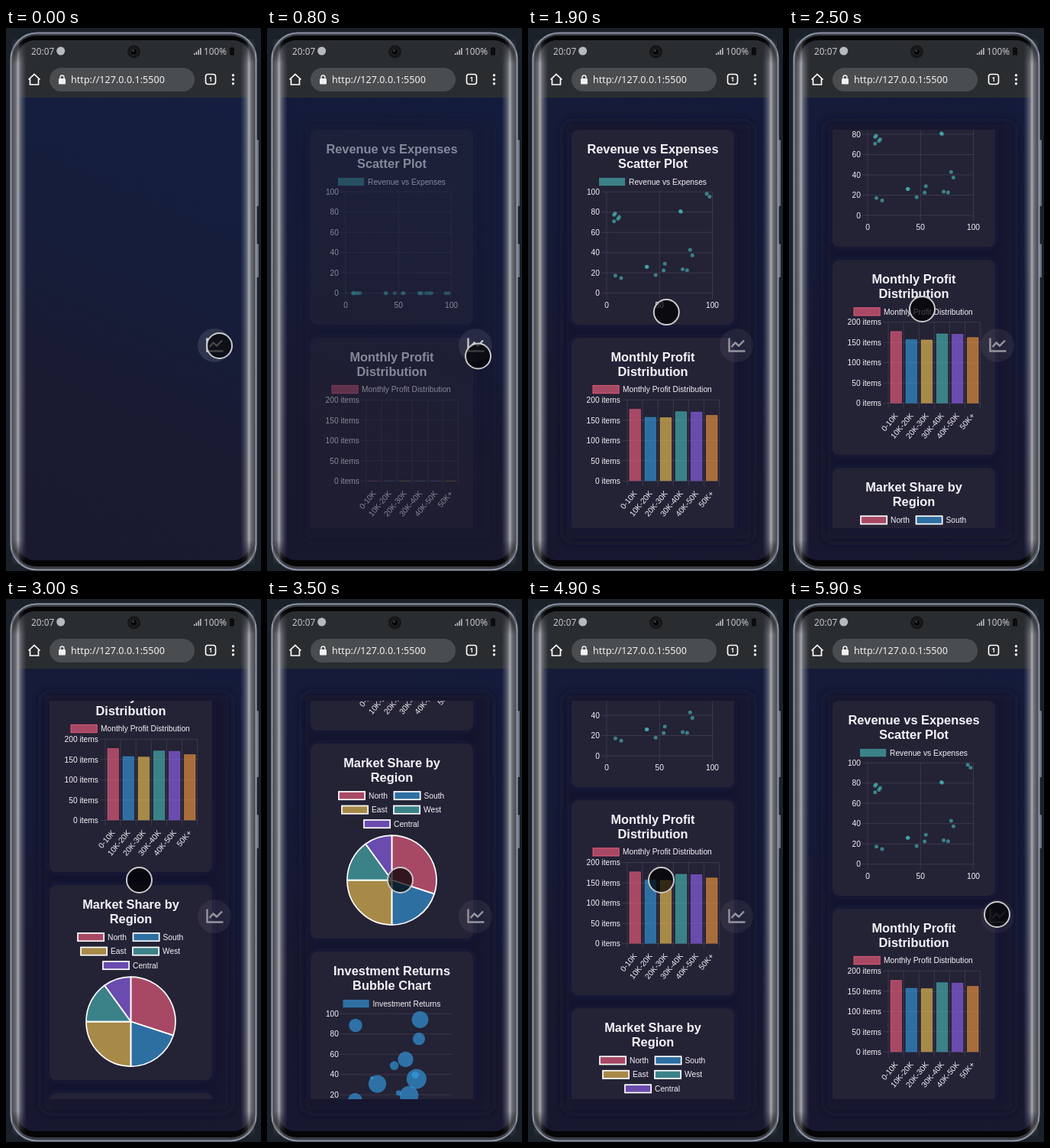
Recreate the animation shown at these times as an HTML page. Size 334x710 px, loop 6 s.

```html
<!DOCTYPE html>
<html lang="en">
<head>
<meta charset="utf-8">
<title>Dashboard on a phone</title>
<style>
html, body { margin: 0; width: 100%; height: 100%; overflow: hidden; background: #1a2128; }
svg { display: block; width: 100vw; height: 100vh; }
.ui { font-family: "Noto Sans", "Open Sans", sans-serif; }
.chart { font: 10.26px "Liberation Sans", Arial, sans-serif; fill: #f4f4f8; }
.title { font-size: 16.4px; font-weight: bold; text-anchor: middle; }
.grid { stroke: #fff; stroke-opacity: .11; stroke-width: .9; fill: none; }
</style>
</head>
<body>
<svg viewBox="0 0 334 710" preserveAspectRatio="none">
  <defs>
    <linearGradient id="page" x1=".6" y1="0" x2=".4" y2="1">
      <stop offset="0" stop-color="#141f41"/><stop offset=".45" stop-color="#161d3a"/>
      <stop offset=".75" stop-color="#1a1a30"/><stop offset="1" stop-color="#19192f"/>
    </linearGradient>
    <linearGradient id="glare">
      <stop offset="0" stop-color="#4a4b50"/><stop offset=".25" stop-color="#6c6d73"/>
      <stop offset=".42" stop-color="#a9aab0"/><stop offset=".55" stop-color="#8f919a" stop-opacity=".65"/>
      <stop offset="1" stop-color="#606880" stop-opacity="0"/>
    </linearGradient>
    <linearGradient id="fade" x1="0" x2="0" y1="0" y2="1">
      <stop offset="0" stop-color="#000"/><stop offset=".05" stop-color="#fff"/>
      <stop offset=".95" stop-color="#fff"/><stop offset="1" stop-color="#000"/>
    </linearGradient>
    <mask id="ends"><rect y="12" width="334" height="692" fill="url(#fade)"/></mask>
    <filter id="soft" x="-20%" y="-20%" width="140%" height="140%"><feGaussianBlur stdDeviation="6"/></filter>
    <clipPath id="screen"><rect x="15" y="16" width="305" height="680" rx="23"/></clipPath>
    <clipPath id="view"><rect x="40" y="133" width="248" height="521"/></clipPath>
  </defs>

  <rect width="334" height="710" fill="#1a2128"/>
  <rect x="327" y="146" width="4" height="87" rx="1.5" fill="#6a727f"/>
  <rect x="327" y="282" width="4" height="44" rx="1.5" fill="#6a727f"/>
  <rect x="6.5" y="6.5" width="321" height="702" rx="34" fill="#3a3c43" stroke="#8d95a8" stroke-width="2.2"/>
  <rect x="9" y="10" width="316" height="694" rx="31" fill="#050506"/>

  <g clip-path="url(#screen)">
    <rect x="15" y="16" width="305" height="680" fill="url(#page)"/>
    <g id="popup">
      <rect x="15" y="16" width="305" height="680" fill="#14152e" opacity=".35"/>
      <rect x="46" y="122" width="250" height="550" rx="10" fill="#18182d" filter="url(#soft)"/>
      <g clip-path="url(#view)"><g id="cards" class="chart"></g></g>
    </g>
    <rect x="15" y="16" width="305" height="75" fill="#2a2d30"/>
  </g>

  <g class="ui" fill="#f2f2f2">
    <g font-size="11.8" fill="#c4c6c8">
      <text x="33" y="35">20:07</text>
      <circle cx="71.7" cy="30" r="5.5" fill="#b7babc"/>
      <text x="259" y="35">100%</text>
      <path d="M246 35v-2h1.5v2zM248.7 35v-4h1.5v4zM251.4 35v-6.5h1.5v6.5zM254.1 35v-9h1.5v9z"/>
      <path d="M293 26h1.5v-1h3v1h1.5v9.5h-6z" fill="#0b0c0d"/>
    </g>
    <circle cx="167.5" cy="31" r="8.5" fill="#141618"/>
    <circle cx="167.5" cy="31" r="4.5" fill="#050608" stroke="#2d3033"/>
    <circle cx="166.5" cy="29.5" r="1.2" fill="#50565e"/>
    <path d="M29.5 67.5L37 60.5L44.5 67.5M31.5 66.5V74H42.5V66.5" fill="none" stroke="#fff" stroke-width="1.7"/>
    <rect x="57" y="52" width="190" height="31" rx="15.5" fill="#4a4d50"/>
    <rect x="69" y="66" width="9" height="7.5" rx="1.2"/>
    <path d="M71 66.5v-2a2.5 2.5 0 0 1 5 0v2" fill="none" stroke="#f2f2f2" stroke-width="1.4"/>
    <text x="85" y="72" font-size="12.6">http://127.0.0.1:5500</text>
    <rect x="261.5" y="60.5" width="13" height="13" rx="3" fill="none" stroke="#fff" stroke-width="1.6"/>
    <text x="268" y="70.3" font-size="8.5" font-weight="bold" text-anchor="middle">1</text>
    <path d="M297.5 61.7v11.1" stroke="#f2f2f2" stroke-width="3.4" stroke-linecap="round" stroke-dasharray="0 5.5"/>
  </g>

  <circle id="halo" cx="273" cy="415" r="22" fill="#fff"/>
  <path id="icon" d="M263.5 405.5V422.5H284.5M266.5 417L271.5 411.5L276 415.5L283 408.5" fill="none" stroke-width="2.4"/>

  <g mask="url(#ends)">
    <rect x="8" y="14" width="19" height="688" fill="url(#glare)"/>
    <rect x="8" y="14" width="19" height="688" fill="url(#glare)" transform="matrix(-1 0 0 1 334 0)"/>
  </g>

  <circle id="cursor" r="16.5" fill="#000" fill-opacity=".7" stroke="#c9c9cc" stroke-width="2"/>
</svg>
<script>
const NS = "http://www.w3.org/2000/svg";
const $ = id => document.getElementById(id);
const PITCH = 272, LOOP = 6000, STEP = 100, MAX_SCROLL = 550;
const LEFT = 103, TOP = 214, BASE = 346.7, ROW = 26.5;
const BAR_BASE = 320.3, BAR_STEP = 20.1;
const RGB = {
  pink: "255,99,132", blue: "54,162,235", gold: "255,206,86",
  teal: "75,192,192", violet: "153,102,255", orange: "255,159,64"
};
const COLORS = Object.keys(RGB);
const tone = (name, a = .6) => `rgba(${RGB[name]},${a})`;
const px = v => LEFT + 1.385 * v;
const py = v => BASE - 1.327 * v;

function seeded(s) {
  return () => (s = s * 16807 % 2147483647) / 2147483647;
}

function add(parent, tag, attrs, text) {
  const el = document.createElementNS(NS, tag);
  for (const k in attrs) el.setAttribute(k, attrs[k]);
  if (text !== undefined) el.textContent = text;
  parent.append(el);
  return el;
}

function label(g, x, y, text, anchor = "start") {
  return add(g, "text", { x, y: y + 3.7, "text-anchor": anchor }, text);
}

function legend(g, x, y, name, text, edge = "none", w = 1) {
  add(g, "rect", { x, y: y - 5.1, width: 34.2, height: 10.3, fill: tone(name), stroke: edge, "stroke-width": w });
  label(g, x + 39, y, text);
}

// Every card is laid out in the first card's place, then moved down.
function card(i, lines) {
  const g = add($("cards"), "g", { transform: `translate(0 ${i * PITCH})` });
  const box = { x: 57, y: 133, width: 213, height: 255, rx: 9 };
  add(g, "rect", { ...box, fill: "#141e46", opacity: .7, filter: "url(#soft)" });
  add(g, "rect", { ...box, fill: "#242235" });
  lines.forEach((s, k) => add(g, "text", { x: 163.5, y: 164 + 19 * k, class: "title" }, s));
  return g;
}

function rows(g, count, step, base, x0, x1, right, unit = "") {
  for (let k = 0; k <= count; k++) {
    const y = base - k * ROW;
    add(g, "path", { d: `M${x0} ${y}H${x1}`, class: "grid" });
    label(g, right, y, k * step + unit, "end");
  }
}

function percentAxes(g, upright) {
  rows(g, 5, 20, BASE, LEFT - 7, px(100), 94);
  for (const v of [0, 50, 100]) {
    if (upright) add(g, "path", { d: `M${px(v)} ${TOP}V${BASE + 7}`, class: "grid" });
    label(g, px(v), 362, v, "middle");
  }
}

// Scatter plot: a few pairs of neighbours and some loose points
const scatter = card(0, ["Revenue vs Expenses", "Scatter Plot"]);
legend(scatter, 93, 201, "teal", "Revenue vs Expenses");
percentAxes(scatter, true);
const rnd = seeded(29);
const points = [];
for (const [x, y] of [[7, 74], [11, 16], [96, 96.5], [80, 40], [74, 23], [70, 80.5], [38, 26]]) {
  const dx = rnd() * 3, dy = rnd() * 4;
  points.push([x - dx, y + dy], [x + dx, y - dy]);
}
for (let k = 0; k < 6; k++) points.push([rnd() * 100, rnd() * 80]);
const dots = points.map(([x, y]) => ({ y, el: add(scatter, "circle", { cx: px(x), r: 2.5, fill: tone("teal") }) }));

// Bar chart
const bar = card(1, ["Monthly Profit", "Distribution"]);
legend(bar, 85, 200.5, "pink", "Monthly Profit Distribution", tone("pink", .8));
rows(bar, 4, 50, BAR_BASE, 123, 250.5, 121, " items");
for (let k = 0; k <= 6; k++) add(bar, "path", { d: `M${130 + BAR_STEP * k} ${TOP}V${BAR_BASE + 7}`, class: "grid" });
const bars = [177, 157, 156, 171, 170, 162].map((v, k) => {
  const x = 133 + BAR_STEP * k;
  const name = k < 5 ? `${k ? k * 10 + "K" : 0}-${k * 10 + 10}K` : "50K+";
  add(bar, "text", { transform: `translate(${x + 7.5} 334.5) rotate(-50)`, y: 3.6, "text-anchor": "end" }, name);
  return { h: v * ROW / 50, x, el: add(bar, "path", { fill: tone(COLORS[k]), stroke: tone(COLORS[k], .5), "stroke-width": .86 }) };
});

// Pie chart
const pie = card(2, ["Market Share by", "Region"]);
const share = [["North", .3, 94], ["South", .2, 166.5], ["East", .25, 98], ["West", .15, 166], ["Central", .1, 127]];
const rim = p => `${163.5 + 58.5 * Math.sin(2 * Math.PI * p)} ${311.5 - 58.5 * Math.cos(2 * Math.PI * p)}`;
let turn = 0;
share.forEach(([name, part, x], k) => {
  legend(pie, x, 201 + 18.5 * Math.floor(k / 2), COLORS[k], name, "#fff", 1.7);
  add(pie, "path", {
    d: `M163.5 311.5L${rim(turn)}A58.5 58.5 0 0 1 ${rim(turn += part)}Z`,
    fill: tone(COLORS[k]), stroke: "#fff", "stroke-width": 1.7, "stroke-linejoin": "round"
  });
});

// Bubble chart: large bubbles in order of size, then small loose ones
const bubble = card(3, ["Investment Returns", "Bubble Chart"]);
legend(bubble, 99.5, 201, "blue", "Investment Returns");
percentAxes(bubble, false);
const ball = (x, y, r) => add(bubble, "circle", { cx: px(x), cy: py(y), r, fill: tone("blue", .62) });
[[67, 35.6], [60, 19.4], [30, 30.7], [70.4, 94], [56.7, 54.8], [9, 14.5], [9.4, 88.3], [69.3, 75]]
  .forEach(([x, y], k) => ball(x, y, 13 - .7 * k));
for (let k = 0; k < 5; k++) ball(20 + 75 * rnd(), 15 + 65 * rnd(), 1 + 1.2 * k);

// Motion
const CURSOR = [[0, 279.5, 415.5], [800, 276.5, 429], [1400, 276.5, 429],
  [2000, 174.5, 367.5], [5500, 174.5, 367.5], [5900, 272.5, 412.5]];
const clamp = v => Math.max(0, Math.min(1, v));
const ease = (t, start, time) => (1 - Math.cos(Math.PI * clamp((t - start) / time))) / 2;

function cursorAt(t) {
  return CURSOR.slice(1).reduce(([x, y], [end, x2, y2], k) => {
    const start = CURSOR[k][0], p = ease(t, start, end - start);
    return [x + (x2 - x) * p, y + (y2 - y) * p];
  }, CURSOR[0].slice(1));
}

function draw(t) {
  const open = clamp((t - 700) / 200);
  const grow = 1 - (1 - clamp((t - 800) / 550)) ** 4;
  const scroll = MAX_SCROLL * (ease(t, 1933, 2004) - ease(t, 4231, 1012));
  $("popup").setAttribute("opacity", open);
  $("cards").setAttribute("transform", `translate(0 ${-scroll})`);
  dots.forEach(d => d.el.setAttribute("cy", py(d.y * grow)));
  bars.forEach(b => b.el.setAttribute("d", `M${b.x} ${BAR_BASE}v${-b.h * grow}h14.5v${b.h * grow}`));

  const [x, y] = cursorAt(t);
  const hover = clamp(1 - Math.hypot(x - 273, y - 415) / 50) * open;
  $("halo").setAttribute("fill-opacity", .11 - .05 * open - .02 * hover);
  $("icon").setAttribute("stroke", open < 1 ? "#e4e6ec" : "#94969f");
  $("icon").setAttribute("opacity", 1 - .5 * hover);
  $("cursor").setAttribute("transform", `translate(${x} ${y})`);
}

function tick() {
  draw(Math.floor(performance.now() % LOOP / STEP) * STEP);
  requestAnimationFrame(tick);
}
tick();
</script>
</body>
</html>
```
